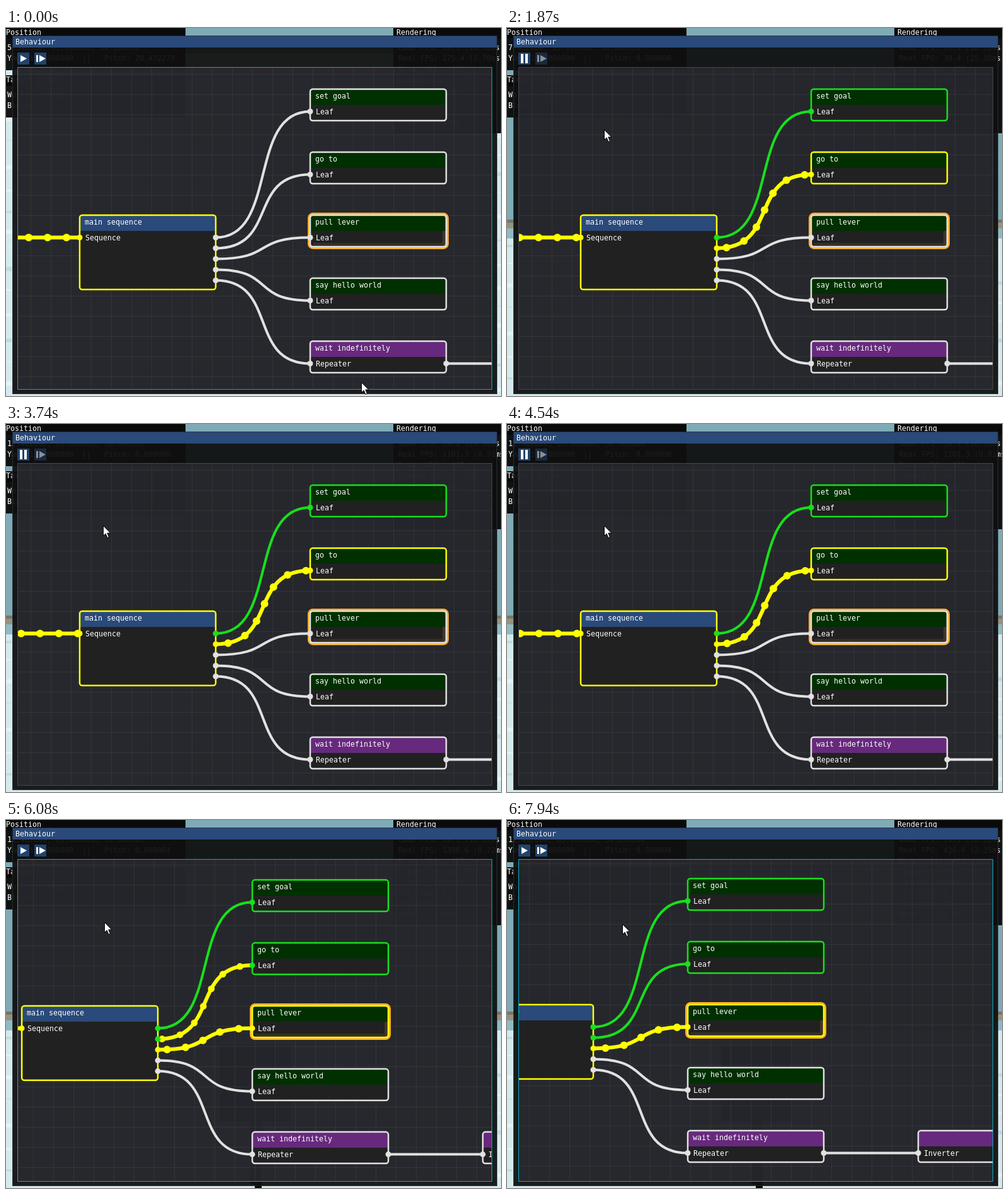
These frames come from a looping animation (786x584 px, 8 s). An HTML page with a canvas:

```html
<!DOCTYPE html>
<html lang="en">
<head>
<meta charset="utf-8">
<title>Behaviour</title>
<style>
html, body { margin: 0; width: 100%; height: 100%; overflow: hidden; background: #0a0a0a; }
canvas { display: block; }
</style>
</head>
<body>
<canvas id="stage" width="786" height="584"></canvas>
<script>
const ctx = document.getElementById('stage').getContext('2d');
const LOOP = 8000, TICK = 110.3;
const PLAY = 10.6, BREAK = 54.14;       // play pressed, breakpoint reached
const PAN = 3.17, FADE = 5.4;           // durations in ticks
const WHITE = '#e1e1e1', GREEN = '#18e01c', YELLOW = '#ffff00';
const BLUE = '#294a7a', LEAF = '#003000', PURPLE = '#67297d';

// rows of [tick, ...values]
const CURSOR = [[0, 564, 562], [1, 556, 550], [3, 420, 390], [5, 200, 190], [8, 32, 57], [9, 27, 49],
  [11, 27, 49], [13, 70, 88], [16, 154, 161], [46, 154, 161], [49, 156, 162], [55, 156, 162],
  [61, 161, 165], [66, 170, 165], [72, 183, 165]];
const PHASE = [[0, 1], [17, 285], [34, 559], [49, 809.5], [55, 906], [72, 1181]];
const PULL_PHASE = [[54.14, 0], [55, 14], [61, 111], [72, 289]];
const SHADOW = [[17, 375, 330, 35, 40], [34, 388, 357, 36, 30], [49, 352, 345, 88, 92], [55, 340, 357, 112, 121]];
const FPS = [[0, 175.4], [17, 39.4], [34, 1101.3], [49, 38.9], [55, 1398.6], [61, 1118.6], [72, 426.4]];

function at(rows, t) {
  let i = 0;
  while (i < rows.length - 2 && rows[i + 1][0] <= t) i++;
  const a = rows[i], b = rows[i + 1];
  const k = Math.min(1, Math.max(0, (t - a[0]) / (b[0] - a[0])));
  return a.slice(1).map((v, j) => v + (b[j + 1] - v) * k);
}

function rect(x, y, w, h, color) {
  ctx.fillStyle = color;
  ctx.fillRect(x, y, w, h);
}

function poly(color, ...p) {
  ctx.fillStyle = color;
  ctx.beginPath();
  for (let i = 0; i < p.length; i += 2) ctx.lineTo(p[i], p[i + 1]);
  ctx.closePath();
  ctx.fill();
}

function dot(x, y, r, color) {
  ctx.fillStyle = color;
  ctx.beginPath();
  ctx.arc(x, y, r, 0, 7);
  ctx.fill();
}

function frame(x, y, w, h, r, color, width) {
  ctx.strokeStyle = color;
  ctx.lineWidth = width;
  ctx.beginPath();
  ctx.roundRect(x, y, w, h, r);
  ctx.stroke();
}

function text(s, x, y, color = '#fff') {
  ctx.fillStyle = color;
  ctx.fillText(s, x, y);
}

function scenery(t) {
  const horizon = t < PLAY ? 40 : 304;
  rect(0, 0, 786, 584, '#7eabb6');
  rect(0, horizon, 786, 280 + 300, '#d5eaed');
  if (t >= PLAY) {
    rect(0, horizon, 786, 5, '#77766a');
    rect(0, horizon + 5, 786, 9, '#96937f');
    rect(0, horizon + 14, 786, 16, '#8ebbc4');
  }
  for (let i = 0; i < 30; i++) {
    const y = horizon + 40 + i * 17 + 7 * Math.sin(i * 9);
    rect(i % 2 * 779, y, 9, 4 + 3 * Math.sin(i * 5), i % 3 ? '#e4f3f5' : '#bfdce1');
  }
  if (t >= 17) {
    rect(...at(SHADOW, t), '#222');
    if (t >= 55) {
      rect(388, 478, 18, 100, '#222');
      rect(395, 578, 11, 6, '#000');
    }
  }
}

function panel(x, y, w, h, title, lines) {
  rect(x, y, w, h, 'rgba(10,10,10,.95)');
  rect(x, y, w, 17, '#0a0a0a');
  text(title, x + (x ? 5 : 0), y + 11);
  lines.forEach((s, i) => text(s, x + (x ? 8 : 2), y + 35 + i * 17));
}

function hud(t) {
  const px = 5.34 + Math.max(0, Math.min(t, 32) - PLAY) * .33;
  const pitch = t < PLAY ? '28.472279' : t < 55 ? '0.000000' : '0.000004';
  const rate = v => v.toFixed(1) + ' (' + (1000 / v).toFixed(2) + 'ms)';
  const fps = FPS.filter(r => r[0] <= t).pop()[1];
  panel(0, 0, 285, 67, 'Position', [px.toFixed(6) + ', 65.000000, 50.000000',
    'Yaw: 180.000000  ||   Pitch: ' + pitch]);
  panel(0, 75, 285, 67, 'Target block', ['World: nothing', 'Block: -']);
  panel(615, 0, 171, 167, 'Rendering', ['Game FPS: ' + rate(59.1), 'Real FPS: ' + rate(fps),
    'Draw calls: 412', 'Loaded chunks: 289', 'Visible chunks: 97', 'Entities: 2', 'Textures: 18', 'Memory: 214 MB']);
}

function toolbar(paused) {
  rect(18, 39, 19, 19, '#21436c');
  rect(45, 39, 19, 19, paused ? '#21436c' : '#18293f');
  if (paused) poly('#fff', 23, 43, 33, 48.5, 23, 54);
  else {
    rect(22, 41, 4, 15, '#fff');
    rect(29, 41, 4, 15, '#fff');
  }
  const icon = paused ? '#fff' : '#8a9099';
  rect(48, 43, 3, 11, icon);
  poly(icon, 53, 43, 63, 48.5, 53, 54);
}

function grid(dx, dy) {
  for (let x = 39 + dx - 32 * Math.floor((dx + 20) / 32); x < 772; x += 32) rect(Math.round(x), 63, 1, 511, 'rgba(120,120,120,.16)');
  for (let y = 73 + dy; y < 574; y += 32) rect(19, Math.round(y), 753, 1, 'rgba(120,120,120,.16)');
}

// flow: { phase, progress } draws the running highlight over the wire
function wire(x1, y1, x2, y2, color, flow) {
  const half = Math.hypot(x2 - x1, y2 - y1) / 2;
  const s = half < 100 ? 100 * Math.sin(Math.PI / 2 * half / 100) : 100;
  const stroke = (c, w) => {
    ctx.strokeStyle = c;
    ctx.lineWidth = w;
    ctx.beginPath();
    ctx.moveTo(x1, y1);
    ctx.bezierCurveTo(x1 + s, y1, x2 - s, y2, x2, y2);
    ctx.stroke();
  };
  stroke(color, 4);
  if (!flow || flow.progress >= 1) return;
  const p = flow.progress;
  stroke(`rgba(255,255,0,${1 - p * p})`, 6);
  const mix = (a, b, c, d, u) => {
    const v = 1 - u;
    return a * v * v * v + 3 * b * v * v * u + 3 * c * v * u * u + d * u * u * u;
  };
  const marker = `rgba(255,255,0,${(1 - p) ** .35})`;
  let next = flow.phase % 30, run = 0, px = x1, py = y1;
  for (let i = 0; i <= 300; i++) {
    const u = i / 300;
    const x = mix(x1, x1 + s, x2 - s, x2, u), y = mix(y1, y1, y2, y2, u);
    run += Math.hypot(x - px, y - py);
    if (run >= next) {
      dot(x, y, 4 * (1 - p) + 2, marker);
      next += 30;
    }
    px = x;
    py = y;
  }
}

function node(x, y, h, title, kind, head, color, selected) {
  ctx.fillStyle = '#212122';
  ctx.beginPath();
  ctx.roundRect(x, y, 216, h, 4);
  ctx.fill();
  ctx.fillStyle = head;
  ctx.beginPath();
  ctx.roundRect(x, y, 216, 25, [4, 4, 0, 0]);
  ctx.fill();
  if (selected) {
    rect(x + 210, y + 25, 5, 23, '#40352a');
    rect(x + 5, y + 44, 205, 4, '#392d22');
    frame(x - 1.5, y - 1.5, 219, h + 3, 6, '#ffb032', 5);
  }
  frame(x, y, 216, h, 4, color, 2.5);
  text(title, x + 8, y + 15);
  text(kind, x + 9, y + 40);
  dot(x, y + 35.5, 4.5, color);
}

function graph(t) {
  const k = Math.min(1, Math.max(0, (t - BREAK) / PAN));
  const ease = 1 - (1 - k) ** 2;
  const dx = -196 * ease, dy = -4 * ease;
  const started = t >= PLAY, broke = t >= BREAK;
  const phase = at(PHASE, t)[0];
  const mainX = 117 + dx, mainY = 297 + dy, leafX = 483 + dx;
  const colors = [started ? GREEN : WHITE, broke ? GREEN : started ? YELLOW : WHITE, broke ? YELLOW : WHITE, WHITE, WHITE];
  const flows = [
    started && { phase, progress: (t - PLAY) / FADE },
    started && { phase, progress: broke ? (t - BREAK) / FADE : 0 },
    broke && { phase: at(PULL_PHASE, t)[0], progress: 0 }
  ];
  const names = ['set goal', 'go to', 'pull lever', 'say hello world', 'wait indefinitely'];

  grid(dx, dy);

  // incoming wire of the main sequence
  rect(mainX - 400, mainY + 32.5, 400, 6, YELLOW);
  for (let d = (phase + 5) % 30 - 240; d < 117; d += 30) dot(d + dx, mainY + 35.5, 6, YELLOW);

  const pinY = i => mainY + 35.5 + 17 * i;
  const leafY = i => 97 + dy + 100 * i;
  names.forEach((n, i) => wire(mainX + 216, pinY(i), leafX, leafY(i) + 35.5, colors[i], flows[i]));
  wire(leafX + 216, leafY(4) + 35.5, leafX + 366, leafY(4) + 35.5, WHITE);

  node(mainX, mainY, 118, 'main sequence', 'Sequence', BLUE, YELLOW);
  names.forEach((n, i) => {
    dot(mainX + 216, pinY(i), 4.5, colors[i]);
    node(leafX, leafY(i), 50, n, i < 4 ? 'Leaf' : 'Repeater', i < 4 ? LEAF : PURPLE, colors[i], i === 2);
  });
  dot(leafX + 216, leafY(4) + 35.5, 4.5, WHITE);
  node(leafX + 366, leafY(4), 50, '', 'Inverter', PURPLE, WHITE);
}

function pointer(x, y) {
  ctx.save();
  ctx.translate(Math.round(x) + .5, Math.round(y) + .5);
  poly('#fff', 0, 0, 0, 16, 3.7, 12.6, 6.5, 19, 9, 18, 6.3, 11.6, 11.3, 11.6);
  ctx.strokeStyle = '#000';
  ctx.lineWidth = 1;
  ctx.stroke();
  ctx.restore();
}

function draw(t) {
  const paused = t < PLAY || t >= BREAK;
  ctx.font = '11.63px "DejaVu Sans Mono", "Liberation Mono", monospace';
  scenery(t);
  hud(t);

  rect(10, 12, 770, 569, 'rgba(15,15,15,.94)');
  rect(11, 13, 768, 18, BLUE);
  frame(10.5, 12.5, 769, 568, 0, 'rgba(110,110,128,.3)', 1);
  text('Behaviour', 15, 26);
  toolbar(paused);

  ctx.save();
  ctx.beginPath();
  ctx.rect(18, 62, 754, 512);
  ctx.clip();
  rect(18, 62, 754, 512, 'rgba(43,44,50,.784)');
  graph(t);
  ctx.restore();
  frame(18.5, 62.5, 753, 511, 0, paused ? '#08aec4' : '#45464d', 1);

  pointer(...at(CURSOR, t));
}

function loop(now) {
  const ms = now % LOOP;
  draw(ms < 100 ? 0 : Math.min(72, 1 + Math.floor((ms - 100) / TICK)));
  requestAnimationFrame(loop);
}
requestAnimationFrame(loop);
</script>
</body>
</html>
```
